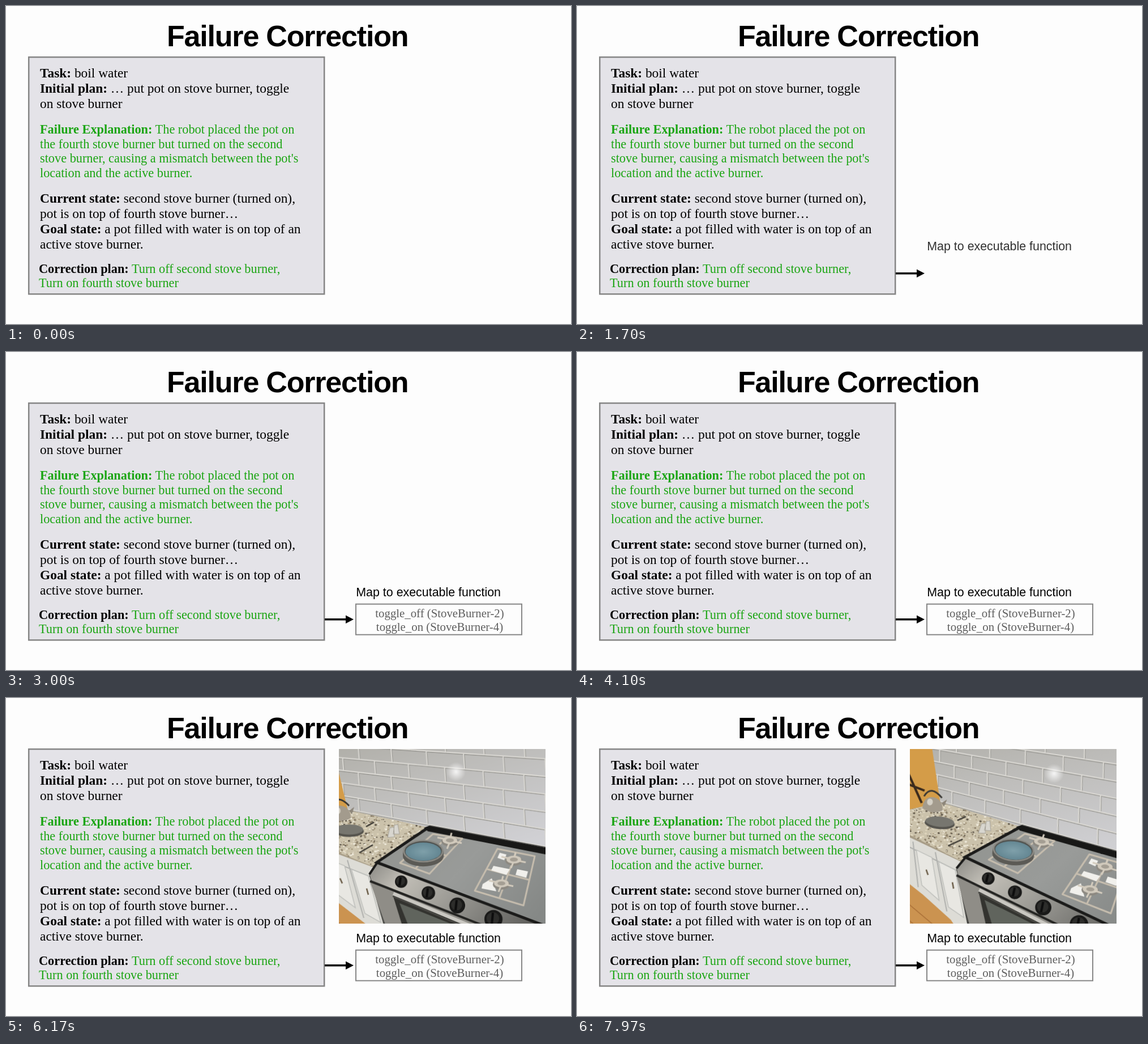
Recreate the animation shown at these times as an HTML page. Size 998 px wide and 561 px high, loop 8000 ms.

```html
<!DOCTYPE html>
<html lang="en">
<head>
<meta charset="utf-8">
<title>Failure Correction</title>
<style>
  html, body { margin: 0; width: 100%; height: 100%; overflow: hidden; background: #fdfdfd; }
  svg { display: block; width: 998px; height: 561px; }
  text { white-space: pre; }
  .title { font: bold 52px "Liberation Sans", Arial, sans-serif; letter-spacing: -1.2px; font-kerning: none; }
  .label { font: 21.4px "Liberation Sans", Arial, sans-serif; }
  .body, .note, .code { font-family: "Liberation Serif", "Times New Roman", serif; font-kerning: normal; }
  .body { font-size: 23.4px; }
  .note { font-size: 22.3px; }
  .code { font-size: 20.8px; text-anchor: middle; fill: #5e5e5e; }
  .b { font-weight: bold; }
  .green { fill: #1aa512; }

  .anim { animation: 8s linear infinite; }
  #arrow { animation-name: arrow; }
  #label { animation-name: label; }
  #calls { animation-name: calls; }
  #photo { animation-name: photo; }
  #flame { animation-name: flame; animation-timing-function: step-end; }
  #camera { animation-name: camera; }
  @keyframes arrow { 0% { opacity: 0 } 10.4%, 100% { opacity: 1 } }
  @keyframes label { 0%, 10.4% { opacity: 0 } 23.8%, 100% { opacity: 1 } }
  @keyframes calls { 0%, 25% { opacity: 0 } 37.5%, 100% { opacity: 1 } }
  @keyframes photo { 0%, 52.5% { opacity: 0 } 62.5%, 100% { opacity: 1 } }
  @keyframes flame { 0% { opacity: 1 } 77%, 100% { opacity: 0 } }
  @keyframes camera {
    0%, 90% { transform: matrix(1, 0, 0, 1, 0, 0) }
    98%, 100% { transform: matrix(1.02, .09, -.09, 1, 43.6, -68.3) }
  }
</style>
</head>
<body>
<svg viewBox="0 0 998 561">
  <defs>
    <clipPath id="frame"><rect x="588.5" y="90.5" width="364" height="307"/></clipPath>
    <clipPath id="counterClip"><path d="M530 223L604 198 745 228 655 293 645 296 530 249Z"/></clipPath>
    <linearGradient id="wall" x2=".6" y2="1">
      <stop stop-color="#a6a49b"/><stop offset=".45" stop-color="#bcbbb8"/><stop offset="1" stop-color="#d2d2d6"/>
    </linearGradient>
    <linearGradient id="steel" x2="1" y2=".5">
      <stop stop-color="#91938f"/><stop offset=".5" stop-color="#999b99"/><stop offset="1" stop-color="#858886"/>
    </linearGradient>
    <linearGradient id="panel" x2="1" y2=".4">
      <stop stop-color="#8a8984"/><stop offset=".2" stop-color="#c2bfb7"/><stop offset=".55" stop-color="#93928d"/><stop offset="1" stop-color="#555552"/>
    </linearGradient>
    <radialGradient id="glow"><stop stop-color="#fff" stop-opacity=".85"/><stop offset="1" stop-color="#fff" stop-opacity="0"/></radialGradient>
    <radialGradient id="water"><stop stop-color="#7fa0aa"/><stop offset="1" stop-color="#648793"/></radialGradient>
  </defs>

  <rect width="998" height="561" fill="#fdfdfd"/>
  <text class="title" x="284" y="71">Failure Correction</text>
  <rect x="40.2" y="90.2" width="522" height="418" fill="#e4e3e8" stroke="#858585" stroke-width="2.5"/>

  <g class="body">
    <text x="60" y="126"><tspan class="b">Task:</tspan> boil water</text>
    <text x="60" y="153"><tspan class="b">Initial plan:</tspan> … put pot on stove burner, toggle</text>
    <text x="60" y="180">on stove burner</text>
    <text x="60" y="347"><tspan class="b">Current state:</tspan> second stove burner (turned on),</text>
    <text x="60" y="374">pot is on top of fourth stove burner…</text>
    <text x="60" y="401"><tspan class="b">Goal state:</tspan> a pot filled with water is on top of an</text>
    <text x="60" y="428">active stove burner.</text>
  </g>
  <g class="note green">
    <text x="60" y="225"><tspan class="b">Failure Explanation:</tspan> The robot placed the pot on</text>
    <text x="60" y="250.5">the fourth stove burner but turned on the second</text>
    <text x="60" y="276">stove burner, causing a mismatch between the pot's</text>
    <text x="60" y="301.5">location and the active burner.</text>
    <text x="58" y="470.5"><tspan class="b" fill="#000">Correction plan:</tspan> Turn off second stove burner,</text>
    <text x="58" y="496">Turn on fourth stove burner</text>
  </g>

  <g id="arrow" class="anim"><path d="M563 470H600V464.5L614 471.7 600 479V473.5H563Z"/></g>
  <text id="label" class="label anim" x="618.3" y="431">Map to executable function</text>
  <g id="calls" class="anim">
    <rect x="618" y="444.7" width="293" height="54" fill="#fdfdfd" stroke="#878787" stroke-width="2"/>
    <text class="code" x="766" y="467.5">toggle_off (StoveBurner-2)</text>
    <text class="code" x="766" y="492">toggle_on (StoveBurner-4)</text>
  </g>

  <g id="photo" class="anim"><g clip-path="url(#frame)"><g id="camera" class="anim">
    <rect x="480" y="40" width="540" height="260" fill="url(#wall)"/>
    <g id="tiles" fill="none"></g>
    <circle cx="795" cy="130" r="17" fill="url(#glow)"/>
    <path d="M480 40H566L604 199 480 245Z" fill="#d49c48"/>
    <path d="M535 135L572 202M535 168L575 180M541 120L540 215" stroke="#3a2a1c" stroke-width="4"/>

    <!-- cabinets and floor -->
    <path d="M480 225L660 296 700 430H480Z" fill="#dddcd6"/>
    <path d="M480 290L540 330 588 362 640 402 670 440H480Z" fill="#cb9350"/>
    <path d="M480 320L620 420M500 360L590 425" stroke="#a96f36" stroke-width="1.5"/>
    <path d="M563 271L579 350M603 286L632 388M480 250L650 318" stroke="#b0b1ae" stroke-width="2" fill="none"/>
    <path d="M570 285L598 296 617 370 585 346ZM610 302L640 314 662 396 634 380Z" fill="#e8e7e2" stroke="#bfc0bc" stroke-width="1.5"/>
    <path d="M590 318L594 327M637 336L640 347" stroke="#6b5d48" stroke-width="2.5"/>

    <!-- granite counter -->
    <path d="M530 223L604 198 745 228 655 293 655 301 530 254Z" fill="#a69b85"/>
    <path d="M530 223L604 198 745 228 655 293 645 296 530 249Z" fill="#cbc2ab"/>
    <g id="granite" clip-path="url(#counterClip)"></g>
    <path d="M624 273L648 259M650 219L636 227" stroke="#47443d" stroke-width="2.5"/>
    <ellipse cx="606" cy="235" rx="26" ry="10" fill="#55534d"/>
    <ellipse cx="606" cy="232" rx="25" ry="9" fill="#77766f"/>
    <path d="M575 190Q585 168 606 190" fill="none" stroke="#3c3934" stroke-width="3"/>
    <path d="M574 211Q574 190 591 190 608 192 609 212 592 222 574 211Z" fill="#a39b8d"/>
    <path d="M606 199L615 192 611 205Z" fill="#8c8579"/>
    <ellipse cx="586" cy="199" rx="5" ry="6" fill="#d5d0c5"/>
    <path d="M674 246L678 229 685 228 686 245ZM684 240L686 224 692 223 695 240Z" fill="#d8d6cf" stroke="#a6a298"/>

    <!-- range -->
    <path d="M641 310L655 290 1010 420V480H690Z" fill="#444441"/>
    <path d="M643 324L860 408 900 470H695Z" fill="#8f8d87"/>
    <path d="M683 347L850 416V460H718Z" fill="#33332f"/>
    <path d="M695 362L790 400 780 430H722Z" fill="#60645d"/>
    <path d="M684 345L840 410" stroke="#c9c7c1" stroke-width="6"/>
    <path d="M683 350L840 416" stroke="#4c4b47" stroke-width="2"/>
    <path d="M642 310L656 292 1000 421 960 447 840 399 646 324Z" fill="url(#panel)"/>
    <path d="M643 323L860 408" stroke="#242422" stroke-width="4"/>
    <path d="M745 228L1000 277V420L655 290Z" fill="url(#steel)"/>
    <path d="M745 229L655 290 1000 420" fill="none" stroke="#1b1b1a" stroke-width="5"/>
    <path d="M642 311L656 290" stroke="#1b1b1a" stroke-width="4"/>
    <path d="M738 229L748 225 1000 273V285L745 235Z" fill="#181817"/>
    <path d="M748 225L1000 272" stroke="#4d4d4b" stroke-width="1.5"/>
    <g id="knobs"></g>

    <g fill="none" stroke="#c6bdae" stroke-width="3" stroke-linejoin="round">
      <path d="M754 240L806 248 748 310 696 291ZM727 264L778 278M780 244L724 300"/>
      <path d="M868 266L934 279 914 366 828 340ZM850 302L925 321M901 272L871 354"/>
    </g>
    <path d="M861 296L890 302 884 312 857 304ZM903 302L922 306 919 317 900 312ZM842 328L858 318 866 341 840 336ZM884 276L872 273 868 282 880 286Z" fill="#f1f0ec"/>
    <g id="burners"></g>
    <g id="flame" class="anim">
      <path d="M762 252L772 248 768 239 780 245 787 235 790 245 803 243 795 251 804 258 790 258 784 267 778 258Z" fill="#82b9cd"/>
      <ellipse cx="784" cy="251" rx="8" ry="4" fill="#a9a89f"/>
    </g>

    <path d="M701 270V279A36 18 0 0 0 773 279V270Z" fill="#5b5a55"/>
    <ellipse cx="737" cy="270" rx="36" ry="20" fill="#8b8a84"/>
    <ellipse cx="737" cy="270" rx="33" ry="17.5" fill="#50524f"/>
    <ellipse cx="737" cy="271" rx="31.5" ry="16" fill="url(#water)"/>
  </g></g></g>
</svg>

<script>
  const byId = id => document.getElementById(id);
  const add = (id, markup) => byId(id).insertAdjacentHTML('beforeend', markup);

  let seed = 11;
  const random = () => (seed = seed * 16807 % 2147483647) / 2147483647;

  // Tile wall: rows converge to the left, every other row is shifted by half a tile.
  const rowY = (x, row) => {
    const k = (x - 588) / 364;
    return (193 - 22 * row) * (1 - k) + (262 - 31 * row) * k;
  };
  const columnX = n => 520 + 48 * n + 2 * n * n;
  let grout = '';
  for (let row = 0; row < 8; row++) {
    grout += `M480 ${rowY(480, row)}L1010 ${rowY(1010, row)}`;
    for (let n = row % 2 / 2; n < 9; n++) {
      const x = columnX(n);
      grout += `M${x} ${rowY(x, row)}L${x - 2} ${rowY(x - 2, row + 1)}`;
    }
  }
  add('tiles', `<path d="${grout}" stroke="#9b9a95" stroke-width="1.5" transform="translate(1.5 2)"/>
    <path d="${grout}" stroke="#dad8d3" stroke-width="2"/>`);

  const tones = ['#8d806a', '#5f574a', '#e6dfcd', '#eee9da', '#a99b80', '#e0d6bd'];
  for (let i = 0; i < 1000; i++) {
    const x = 530 + random() * 210, y = 195 + random() * 100, r = .5 + random() * 1.2;
    add('granite', `<ellipse cx="${x.toFixed(1)}" cy="${y.toFixed(1)}" rx="${(r * 1.3).toFixed(1)}" ry="${r.toFixed(1)}" fill="${tones[i % tones.length]}"/>`);
  }

  for (const [x, y, r] of [[698, 324, 11], [746, 344, 12], [797, 366, 14], [861, 390, 16]]) {
    add('knobs', `<circle cx="${x}" cy="${y}" r="${r}" fill="#191918"/>
      <circle cx="${x - 1}" cy="${y - 1}" r="${r * .7}" fill="#2d2d2b"/>
      <path d="M${x - 1} ${y - r * .7}L${x - 3} ${y + r * .6}" stroke="#0d0d0d" stroke-width="4"/>`);
  }

  for (const [x, y] of [[784, 251], [897, 285], [875, 327]]) {
    add('burners', `<ellipse cx="${x}" cy="${y + 2}" rx="15" ry="9" fill="#8d8981"/>
      <ellipse cx="${x}" cy="${y}" rx="13" ry="7" fill="#d0c9bc"/>
      <ellipse cx="${x}" cy="${y}" rx="7" ry="3.5" fill="#a49e93"/>
      <path d="M${x - 22} ${y - 5}L${x - 8} ${y - 2}M${x + 8} ${y + 2}L${x + 21} ${y + 5}M${x + 3} ${y - 13}L${x + 1} ${y - 5}M${x - 1} ${y + 5}L${x - 5} ${y + 15}" stroke="#d3cbbd" stroke-width="3"/>`);
  }
</script>
</body>
</html>
```
